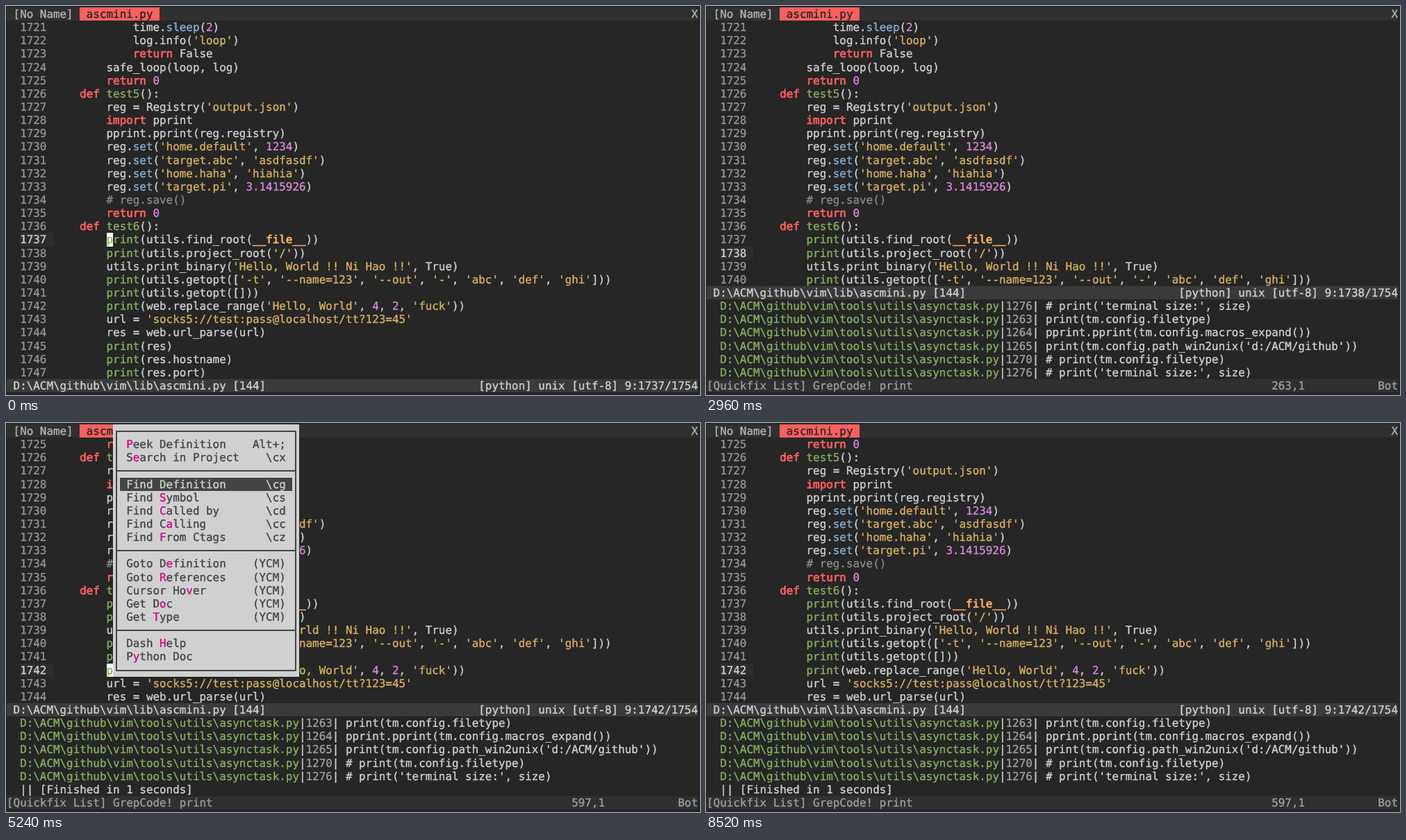
Animation, 999 px wide and 561 px high, one loop 8.68 s. Source, as an HTML page with a canvas:

```html
<!DOCTYPE html>
<html lang="en">
<head>
<meta charset="utf-8">
<title>Editor context menu</title>
<style>
  html, body { margin: 0; width: 100%; height: 100%; overflow: hidden; background: #262626; }
  canvas { display: block; width: 999px; height: 561px; }
</style>
</head>
<body>
<canvas id="screen" width="999" height="561"></canvas>
<script>
const ctx = document.getElementById('screen').getContext('2d');
const CELL_W = 9.567, CELL_H = 19.14, LEFT = 1, TOP = 2, COLS = 104;
const FONT = '15.9px "DejaVu Sans Mono", "Noto Sans Mono", monospace';
const REGULAR = .35, HEAVY = .75;
const LOOP = 8680;

const color = {
  back: '#262626', text: '#d0d0d0', dim: '#949494', bar: '#3a3a3a', tabs: '#303030',
  current: '#2d2d2d', red: '#ff5f5f', popup: '#d0d0d0', ink: '#444444',
  hotkey: '#d70087', path: '#87af5f'
};
const syntaxColor = {
  string: '#d7af5f', comment: '#8a8a8a', keyword: color.red, func: '#87af5f',
  special: '#ffaf5f', builtin: '#87afd7', number: '#d787d7'
};
const syntax = new RegExp([
  "(?<string>'[^']*')", '(?<comment>#.*)', '\\b(?<keyword>def|return|import)\\b',
  '\\b(?<func>print(?=\\()|test\\d)', '(?<special>__file__)',
  '\\b(?<builtin>set|sleep)\\b', '\\b(?<number>\\d+(?:\\.\\d+)?)\\b'
].join('|'), 'g');

const FIRST_LINE = 1721;
const code = String.raw`            time.sleep(2)
            log.info('loop')
            return False
        safe_loop(loop, log)
        return 0
    def test5():
        reg = Registry('output.json')
        import pprint
        pprint.pprint(reg.registry)
        reg.set('home.default', 1234)
        reg.set('target.abc', 'asdfasdf')
        reg.set('home.haha', 'hiahia')
        reg.set('target.pi', 3.1415926)
        # reg.save()
        return 0
    def test6():
        print(utils.find_root(__file__))
        print(utils.project_root('/'))
        utils.print_binary('Hello, World !! Ni Hao !!', True)
        print(utils.getopt(['-t', '--name=123', '--out', '-', 'abc', 'def', 'ghi']))
        print(utils.getopt([]))
        print(web.replace_range('Hello, World', 4, 2, 'fuck'))
        url = 'socks5://test:pass@localhost/tt?123=45'
        res = web.url_parse(url)
        print(res)
        print(res.hostname)
        print(res.port)`.split('\n');

// "&" marks the hotkey, an empty entry is a separator.
const menu = `&Peek Definition|Alt+;
S&earch in Project|\\cx

Find &Definition|\\cg
Find &Symbol|\\cs
Find &Called by|\\cd
Find C&alling|\\cc
Find &From Ctags|\\cz

Goto D&efinition|(YCM)
Goto &References|(YCM)
Cursor Ho&ver|(YCM)
Get D&oc|(YCM)
Get &Type|(YCM)

Dash &Help|
P&ython Doc|`.split('\n');

const help = String.raw`Help on built-in function print in module builtins:

print(...)
    print(value, ..., sep=' ', end='\n', file=sys.stdout, flush=False)

    Prints the values to a stream, or to sys.stdout by default.
    Optional keyword arguments:
    file:  a file-like object (stream); defaults to the current sys.stdout.
    sep:   string inserted between values, default a space.
    end:   string appended after the last value, default a newline.
    flush: whether to forcibly flush the stream.
`.split('\n');

const matches = [
  [1263, 'print(tm.config.filetype)'],
  [1264, 'pprint.pprint(tm.config.macros_expand())'],
  [1265, "print(tm.config.path_win2unix('d:/ACM/github'))"],
  [1270, '# print(tm.config.filetype)'],
  [1276, "# print('terminal size:', size)"]
];
const TOTAL = 597;

// Each step changes some of the state and keeps the rest.
const steps = [
  [0, { line: 1737, cursor: true, menu: 0, help: '', found: -1 }],
  [160, { line: 1738 }],
  [480, { menu: 1, cursor: false }],
  [600, { cursor: true }],
  [920, { menu: 4 }],
  [1080, { menu: 7 }],
  [1200, { menu: 10 }],
  [1400, { menu: 13 }],
  [1520, { menu: 17 }],
  [1960, { cursor: false }],
  [2320, { menu: 2, cursor: true }],
  [2480, { menu: 0, cursor: false }],
  [2640, { found: 0 }],
  [2800, { found: 121 }],
  [2920, { found: 263 }],
  [3080, { found: 404 }],
  [3240, { found: 548 }],
  [3400, { found: 596 }],
  [3560, { found: TOTAL }],
  [3720, { line: 1739, cursor: true }],
  [4160, { cursor: false }],
  [4320, { line: 1740, cursor: true }],
  [4480, { line: 1741 }],
  [4640, { cursor: false }],
  [4800, { line: 1742, cursor: true }],
  [5080, { menu: 1, cursor: false }],
  [5240, { menu: 4, cursor: true }],
  [5560, { menu: 7 }],
  [5720, { menu: 12 }],
  [5880, { menu: 17 }],
  [6360, { menu: 0, help: 'plain', cursor: false }],
  [6520, { help: 'framed', cursor: true }],
  [6960, { cursor: false }],
  [7440, { cursor: true }],
  [7880, { help: '' }],
  [8520, { cursor: false }]
];
let merged = {};
const states = steps.map(([, change]) => merged = { ...merged, ...change });

const colX = col => LEFT + col * CELL_W;
const rowY = row => TOP + row * CELL_H;

function fill(col, row, cols, rows, paint) {
  const x = Math.round(colX(col)), y = Math.round(rowY(row));
  ctx.fillStyle = paint;
  ctx.fillRect(x, y, Math.round(colX(col + cols)) - x, Math.round(rowY(row + rows)) - y);
}

// A hairline outline gives the glyphs the sturdier stems of a terminal face.
function write(col, row, text, paint = color.text, weight = REGULAR) {
  ctx.fillStyle = ctx.strokeStyle = paint;
  ctx.lineWidth = weight;
  [...text].forEach((char, i) => {
    if (char === ' ') return;
    const x = colX(col + i), y = rowY(row) + 15;
    ctx.fillText(char, x, y);
    ctx.strokeText(char, x, y);
  });
}

function writeCode(col, row, text) {
  let end = 0;
  for (const match of text.matchAll(syntax)) {
    const kind = Object.keys(match.groups).find(name => match.groups[name]);
    const weight = kind === 'keyword' || kind === 'special' ? HEAVY : REGULAR;
    write(col + end, row, text.slice(end, match.index));
    write(col + match.index, row, match[0], syntaxColor[kind], weight);
    end = match.index + match[0].length;
  }
  write(col + end, row, text.slice(end));
}

function drawFrame(col, row, cols, rows) {
  fill(col, row, cols, rows, color.popup);
  ctx.strokeStyle = color.ink;
  ctx.lineWidth = 2;
  ctx.strokeRect(Math.round(colX(col + .5)), Math.round(rowY(row + .5)),
    Math.round((cols - 1) * CELL_W), Math.round((rows - 1) * CELL_H));
}

function drawTabs() {
  fill(0, 0, COLS, 1, color.tabs);
  write(1, 0, '[No Name]', '#b2b2b2');
  fill(11, 0, 12, 1, color.red);
  write(12, 0, 'ascmini.py', color.back);
  write(103, 0, 'X', '#b2b2b2');
}

function drawEditor({ line, cursor, found }) {
  const rows = found < 0 ? 27 : 20;
  const first = FIRST_LINE + Math.max(0, line - 1738);
  for (let row = 1; row <= rows; row++) {
    const number = first + row - 1, current = number === line;
    if (current) {
      fill(2, row, 5, 1, color.current);
      if (cursor) fill(15, row, 1, 1, '#ffffff');
    }
    write(2, row, String(number), current ? color.text : color.dim);
    writeCode(7, row, code[number - FIRST_LINE]);
  }
  fill(0, rows + 1, COLS, 1, color.bar);
  write(1, rows + 1, 'D:\\ACM\\github\\vim\\lib\\ascmini.py [144]');
  write(71, rows + 1, `[python] unix [utf-8] 9:${line}/1754`);
}

function drawQuickfix({ found }) {
  const done = found === TOTAL;
  for (let i = 0; found > 0 && i < 6; i++) {
    const row = 22 + i;
    if (done && i === 5) {
      write(2, row, '|| [Finished in 1 seconds]');
      break;
    }
    const [number, text] = matches[(i + TOTAL - found) % matches.length];
    write(2, row, 'D:\\ACM\\github\\vim\\tools\\utils\\asynctask.py', color.path);
    write(44, row, '|');
    write(45, row, String(number), '#a0a0a0');
    write(49, row, '| ' + text);
  }
  fill(0, 28, COLS, 1, color.tabs);
  write(0, 28, '[Quickfix List] GrepCode! print', '#9e9e9e');
  write(85, 28, found ? `${found},1` : '0,0-1', '#9e9e9e');
  write(101, 28, found ? 'Bot' : 'All', '#9e9e9e');
}

function drawMenu(selected) {
  drawFrame(16, 0, 28, 19);
  menu.forEach((entry, i) => {
    const row = i + 1;
    if (!entry) {
      ctx.fillStyle = color.ink;
      ctx.fillRect(Math.round(colX(16.5)), Math.round(rowY(row + .5)) - 1, Math.round(27 * CELL_W), 2);
      return;
    }
    const [label, keys] = entry.split('|');
    const at = label.indexOf('&'), text = label.replace('&', '');
    const active = row === selected, paint = active ? color.popup : color.ink;
    if (active) fill(17, row, 26, 1, color.ink);
    write(18, row, text.slice(0, at), paint);
    write(18 + at, row, text[at], active ? paint : color.hotkey);
    write(19 + at, row, text.slice(at + 1), paint);
    write(42 - keys.length, row, keys, paint);
  });
}

function drawHelp(style) {
  if (style === 'framed') drawFrame(13, 4, 79, 14);
  else fill(15, 5, 75, 12, color.popup);
  help.forEach((text, i) => write(15, 5 + i, text, color.ink));
}

function draw(state) {
  ctx.fillStyle = color.back;
  ctx.fillRect(0, 0, 999, 561);
  ctx.font = FONT;
  ctx.textRendering = 'geometricPrecision';
  ctx.lineJoin = 'round';
  drawTabs();
  drawEditor(state);
  if (state.found >= 0) drawQuickfix(state);
  if (state.menu) drawMenu(state.menu);
  if (state.help) drawHelp(state.help);
}

let shown = -1;
const start = performance.now();
function tick() {
  const time = (performance.now() - start) % LOOP;
  const index = steps.findLastIndex(([from]) => from <= time);
  if (index !== shown) draw(states[shown = index]);
  requestAnimationFrame(tick);
}
tick();
</script>
</body>
</html>
```
